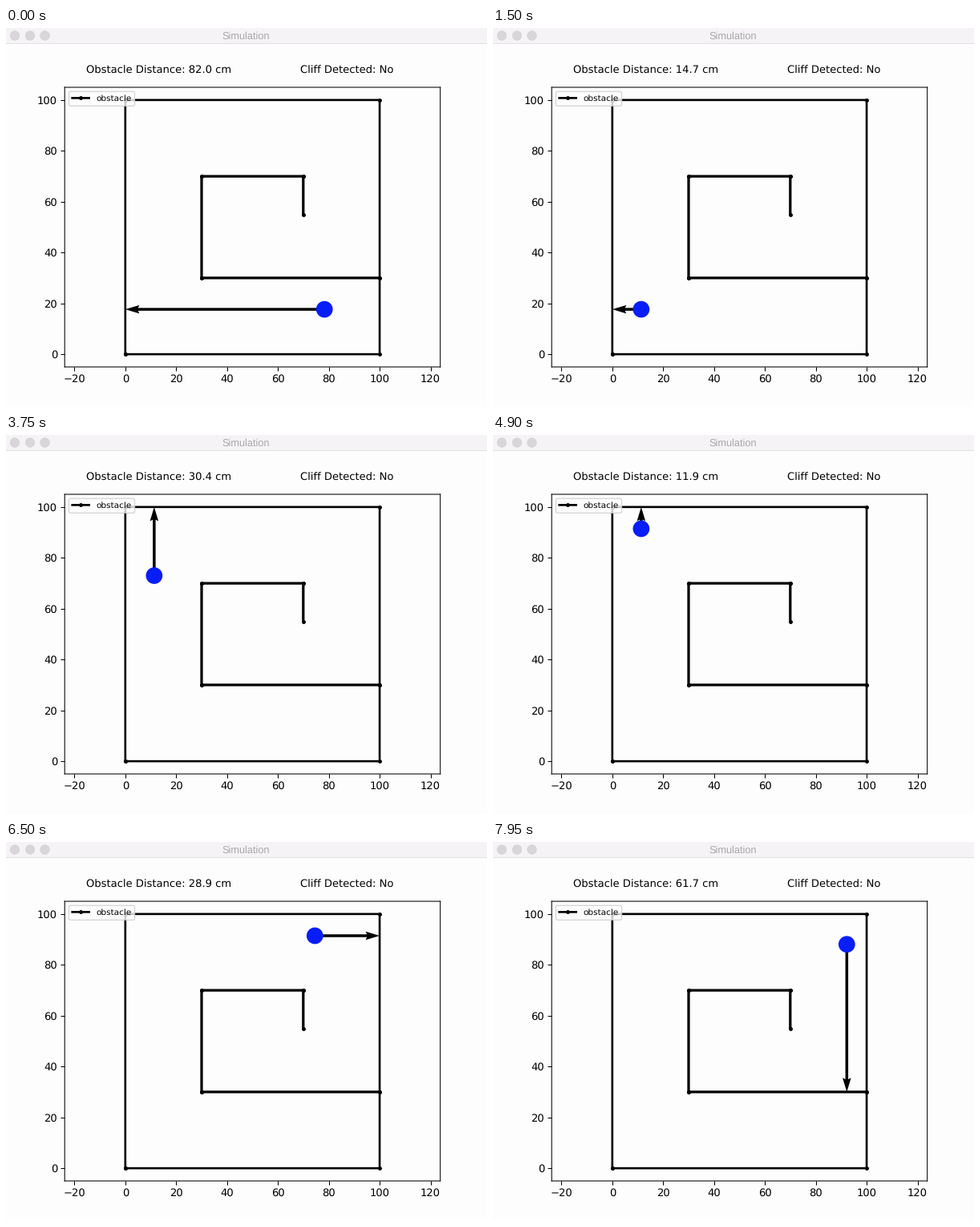
Recreate the animation shown at these times as a matplotlib script. Size 600 by 473 pixels, loop 8000 ms.

```python
import numpy as np
import matplotlib.pyplot as plt
from matplotlib.animation import FuncAnimation
from matplotlib.patches import Circle, Rectangle

W, H, DPI = 600, 473, 64
K = 94.46 / DPI          # scale of the plot's point sizes
TICK = 50                # ms per frame
FRAMES = 160
PAPER = "#fefdfe"

plt.rcParams.update({
    "font.family": "DejaVu Sans",
    "font.size": 10 * K,
    "text.hinting": "none",
    "path.snap": False,
    "axes.linewidth": 0.8 * K,
    "axes.facecolor": PAPER,
    "lines.linewidth": 2 * K,
    "lines.markersize": 6 * K,
    "patch.linewidth": 1.0 * K,
})
for axis in ("xtick", "ytick"):
    plt.rcParams.update({
        f"{axis}.major.size": 3.5 * K,
        f"{axis}.major.pad": 3.5 * K,
        f"{axis}.major.width": 0.8 * K,
    })

fig = plt.figure(figsize=(W / DPI, H / DPI), dpi=DPI, facecolor=PAPER)

# Window frame and labels, in pixels from the top left
win = fig.add_axes([0, 0, 1, 1])
win.set(xlim=(0, W), ylim=(H, 0))
win.axis("off")
win.add_patch(Rectangle((0, 0), W, 19, fc="#f5f3f5", lw=0))
win.add_patch(Rectangle((0, 19), W, 1, fc="#e3e1e3", lw=0))
for x in (11, 30, 48.5):
    win.add_patch(Circle((x, 9.5), 5.8, fc="#d8d6d8", ec="#cfcdcf", lw=0.5))
win.text(299.5, 14, "Simulation", ha="center", color="#a9a7a9",
         family="Liberation Sans", size=12.8 * 72 / DPI)
distance = win.text(100, 56.5, "")
win.text(366.7, 56.5, "Cliff Detected: No")

# Map of the room
ax = fig.add_axes([73.2 / W, 50 / H, 468.5 / W, 349 / H])
half = 55 * 468.5 / 349
ax.set(xlim=(50 - half, 50 + half), ylim=(-5, 105))
ax.set_xticks(range(-20, 121, 20))
ax.set_yticks(range(0, 101, 20))
walls = [(0, 0), (100, 0), (100, 30), (30, 30), (30, 70), (70, 70), (70, 55),
         (70, 70), (30, 70), (30, 30), (100, 30), (100, 100), (0, 100), (0, 0)]
ax.plot(*zip(*walls), "k.-", label="obstacle")
ax.legend(loc="upper left", fontsize=8 * K)

beam = ax.quiver([0], [0], [1], [0], angles="xy", scale_units="xy", scale=1,
                 color="k", zorder=3)
robot = ax.add_patch(Circle((0, 0), 3.27, fc="#081ef8", lw=0, zorder=4))


class Leg:
    """Straight run along one axis, made of equal steps."""

    def __init__(self, axis, side, first, last, origin, step, start, period,
                 wall, back=0, look=0):
        self.axis, self.side = axis, side
        self.first, self.last = first, last
        self.origin, self.step = origin, step
        self.start, self.period = start, period
        self.wall, self.back, self.look = wall, back, look

    def place(self, t):
        n = 0 if t < self.start else int((t - self.start) / self.period) + 1
        low, high = sorted((self.first, self.last))
        at = np.clip(self.origin + self.step * n, low, high) if n else self.first
        return (at, self.side) if self.axis == 0 else (self.side, at)

    def target(self, t):
        """Wall coordinate seen: the wrong side first, then the way ahead."""
        return self.back if t < self.look + 100 else self.wall


LEFT, RIGHT, LOW, HIGH = 11.36, 92.2, 17.66, 91.45
legs = [
    Leg(0, LOW, 78.3, LEFT, 78.3, -2.678, 50, 60.4, wall=0, look=-100),
    Leg(1, LEFT, LOW, HIGH, LOW, 2.6355, 2510, 60, wall=100, back=0, look=2300),
    Leg(0, HIGH, LEFT, RIGHT, 11.15, 2.641, 5120, 59.5, wall=100, back=0,
        look=4950),
    Leg(1, RIGHT, HIGH, 33, 90.72, -2.64, 7950, 60, wall=30, back=100,
        look=7750),
]


def draw(i):
    t = i * TICK
    leg = [g for g in legs if g.look <= t][-1]
    pos = leg.place(t)
    reach = leg.target(t) - pos[leg.axis]
    u, v = (reach, 0) if leg.axis == 0 else (0, reach)
    robot.center = pos
    beam.set_offsets([pos])
    beam.XY = np.array([pos])
    beam.set_UVC([u], [v])
    cm = 3.3 + 1.0055 * abs(reach)
    distance.set_text(f"Obstacle Distance: {cm:.1f} cm")
    return robot, beam, distance


anim = FuncAnimation(fig, draw, frames=FRAMES, interval=TICK, repeat=True,
                     repeat_delay=0, blit=False)
plt.show()
```
